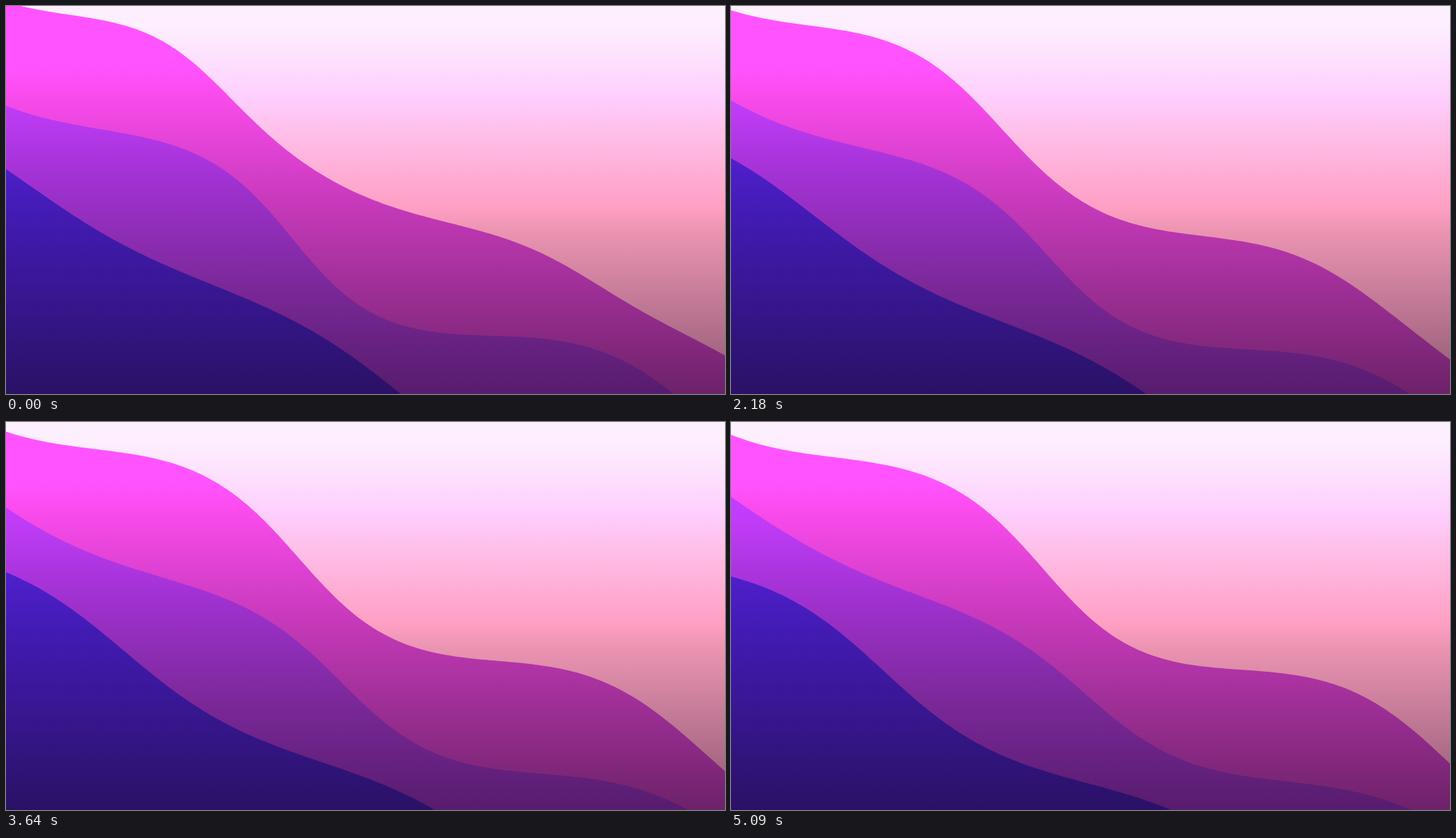
Write an HTML page that moves like this. It is 1018 by 550 pixels and loops after 6.09 s.

```html
<!DOCTYPE html>
<html lang="en">
<head>
<meta charset="utf-8">
<title>Layered waves</title>
<style>
  html, body { margin: 0; width: 100%; height: 100%; overflow: hidden; background: #fdeffe; }
  svg { display: block; width: 100vw; height: 100vh; }
</style>
</head>
<body>
<svg id="stage" viewBox="0 0 1018 550" preserveAspectRatio="none"></svg>
<script>
const W = 1018, H = 550;
const LOOP = 6090, STEP = 90.9, LAST = 56;
const SLOPE = 0.5;                 // every ridge runs downhill
const LEAN = 0.4;                  // ripples stand square to the slope
const PITCH = Math.PI / 600;       // wave number of the longest ripple
const RAD = Math.PI / 180;

const sky = [[26, '#fdeffe'], [130, '#fdcffd'], [160, '#fec5f0'],
             [285, '#ff9fc4'], [320, '#eb94b2'], [550, '#8c5771']];

// Each layer is a sloping line plus travelling ripples.
// Pairs are [start, end] over the run; phases are in degrees, bend curves the change.
const layers = [
  {
    stops: [[88, '#ff53ff'], [120, '#fc4cef'], [275, '#c83abc'], [550, '#6d2269']],
    base: [-17, -17], bend: 1,
    ripples: [
      { n: 1, amp: [12, 5], phase: [-158, -161] },
      { n: 2, amp: [25, 44], phase: [-61, -9] },
      { n: 3, amp: [8.4, 3.2], phase: [27, 158] },
      { n: 4, amp: [3.4, 0.8], phase: [10, 60] }
    ]
  },
  {
    stops: [[110, '#c43dff'], [140, '#c03cf8'], [240, '#a332d4'],
            [400, '#7a2898'], [550, '#561c6d']],
    base: [115, 112], bend: -0.4,
    ripples: [
      { n: 1, amp: [13.4, 25.9], phase: [138, 148] },
      { n: 2, amp: [44.3, 25.7], phase: [-25, 38] },
      { n: 3, amp: [5.2, 5], phase: [121, 220] }
    ]
  },
  {
    stops: [[216, '#4f20cc'], [290, '#431bb5'], [550, '#2a1165']],
    base: [256.5, 254.5], bend: -1,
    ripples: [
      { n: 1, amp: [25, 15], phase: [200, 215] },
      { n: 2, amp: [21, 31], phase: [90, 211] }
    ]
  }
];

const svg = document.getElementById('stage');

function add(parent, name, attrs) {
  const node = document.createElementNS(svg.namespaceURI, name);
  for (const key in attrs) node.setAttribute(key, attrs[key]);
  return parent.appendChild(node);
}

function gradient(id, stops) {
  const g = add(svg, 'linearGradient',
    { id, gradientUnits: 'userSpaceOnUse', x1: 0, y1: 0, x2: 0, y2: H });
  for (const [y, color] of stops) add(g, 'stop', { offset: y / H, 'stop-color': color });
  return `url(#${id})`;
}

const mix = ([a, b], s) => a + (b - a) * s;

function outline({ base, bend, ripples }, s) {
  const swell = s + bend * s * (1 - s);
  const top = mix(base, s);
  const waves = ripples.map(r => ({
    k: r.n * PITCH, amp: mix(r.amp, swell), phase: mix(r.phase, s) * RAD
  }));
  const points = [];
  for (let u = -60; u <= W + 100; u += 6) {
    const lift = waves.reduce((sum, w) => sum + w.amp * Math.cos(w.k * u - w.phase), 0);
    const x = u - LEAN * lift;
    points.push(`${x.toFixed(2)} ${(top + SLOPE * x + lift).toFixed(2)}`);
  }
  return `M${points.join('L')}V${H + 200}H-100Z`;
}

add(svg, 'rect', { width: W, height: H, fill: gradient('sky', sky) });
layers.forEach((layer, i) => {
  layer.path = add(svg, 'path', { fill: gradient('layer' + i, layer.stops) });
});

function render(t) {
  const step = Math.min(LAST, Math.floor((t + 5) / STEP));
  for (const layer of layers) layer.path.setAttribute('d', outline(layer, step / LAST));
}

const start = performance.now();
function tick() {
  render((performance.now() - start) % LOOP);
  requestAnimationFrame(tick);
}
tick();
</script>
</body>
</html>
```
